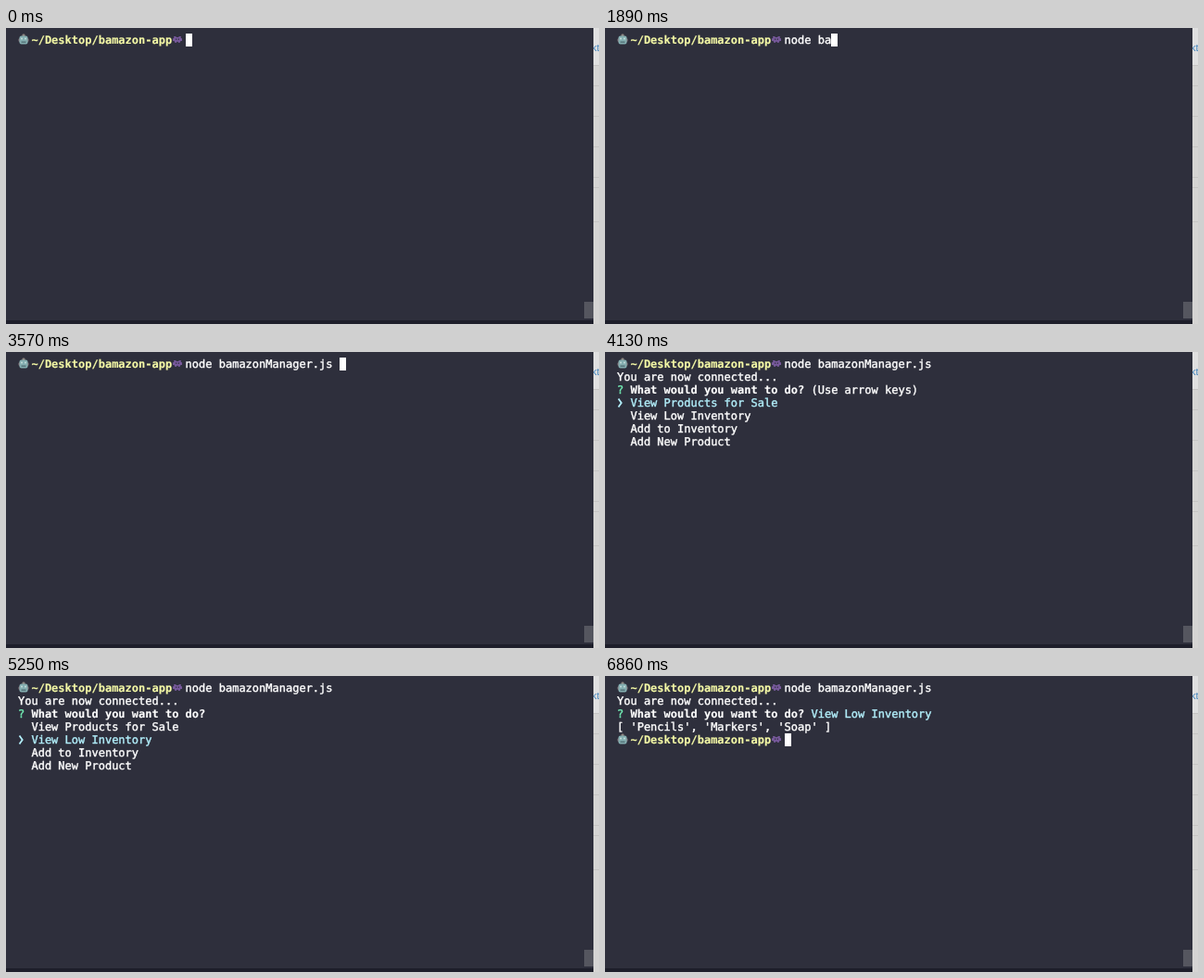
Animation, 640 px wide and 320 px high, one loop 6930 ms. Source, as an HTML page:

```html
<!DOCTYPE html>
<html lang="en">
<head>
<meta charset="utf-8">
<title>Terminal session</title>
<style>
  html, body { margin: 0; width: 100%; height: 100%; overflow: hidden; background: #2e2f3c; }
  svg { display: block; width: 640px; height: 320px; }
  text {
    font: 12px "DejaVu Sans Mono", monospace;
    text-rendering: geometricPrecision;
    white-space: pre;
    color: #fff;
    fill: currentColor;
    stroke: currentColor;
    stroke-width: 0.4;
  }
  .bold, .path { font-weight: bold; stroke-width: 0.15; }
  .path { color: #f4f9a6; }
  .green { color: #72ecb4; }
  .cyan { color: #b2effb; }
  .behind { font: 11px "Liberation Sans", sans-serif; color: #3f83bd; stroke: none; }
</style>
</head>
<body>
<svg viewBox="0 0 640 320">
  <defs>
    <g id="robot">
      <rect x="0.5" y="5" width="11" height="4" rx="1.5" fill="#85757a"/>
      <rect x="4.5" y="0.5" width="3" height="3" rx="1" fill="#8d8580"/>
      <rect x="1.5" y="2.5" width="9" height="9" rx="2" fill="#84aeb0"/>
      <circle cx="4" cy="5.5" r="1" fill="#c4dcda"/>
      <circle cx="8" cy="5.5" r="1" fill="#c4dcda"/>
      <rect x="3.5" y="8.5" width="5" height="1.5" fill="#56757b"/>
    </g>
    <g id="alien">
      <path d="M1 1h2l1 1h2l1-1h2L8.500 2.500 10 3.500v2.500H8.500L7.500 8H6.500L5 6.500 3.500 8h-1L1.500 6H0V3.500l1.500-1z" fill="#76589a"/>
      <path d="M3 3.500h1.300v1.300H3zM5.700 3.500H7v1.300H5.700z" fill="#2e2f3c"/>
    </g>
  </defs>
  <rect x="634" width="6" height="320" fill="#d5d4d3"/>
  <rect x="634" width="6" height="40" fill="#e0e0e0"/>
  <path d="M634 40.500h6M634 62.500h6M634 95.500h6M634 128.500h6M634 161.500h6M634 172.500h6M634 209.500h6" stroke="#c6c5c4"/>
  <text class="behind" x="632" y="24.500">kt</text>
  <rect width="634" height="320" fill="#2e2f3c"/>
  <rect y="316" width="634" height="4" fill="#1d1e2a"/>
  <rect x="624" y="296" width="10" height="18" fill="#55565f"/>
  <g id="screen"></g>
</svg>
<script>
const LOOP = 6930, STEP = 70;
const LEFT = 13, CELL = 7.224, ROW = 14;
const COMMAND = 'node bamazonManager.js ';
const CHOICES = ['View Products for Sale', 'View Low Inventory', 'Add to Inventory', 'Add New Product'];

// [time, characters on the command line]; the jumps are tab completions
const KEYS = [[350, 1], [490, 2], [560, 3], [700, 4], [840, 5], [1050, 6], [1260, 7],
  [2030, 12], [3080, 13], [3220, 23]];
const ENTER = 3640, MENU = 4130, DOWN = 4830, CHOOSE = 5600, DONE = 5670;

const screen = document.getElementById('screen');
const colX = col => LEFT + col * CELL;

const print = (row, col, str, cls = '') =>
  `<text class="${cls}" x="${colX(col)}" y="${17 + row * ROW}">${str}</text>`;

const cursor = (row, col) =>
  `<rect x="${Math.round(colX(col))}" y="${6 + row * ROW}" width="7" height="14" fill="#fff"/>`;

const prompt = row =>
  `<use href="#robot" x="13" y="${6 + row * ROW}"/>` +
  print(row, 2, '~/Desktop/bamazon-app', 'path') +
  `<use href="#alien" x="180" y="${8 + row * ROW}"/>`;

const pointer = row =>
  `<path d="M14.500 ${8.500 + row * ROW}l3.200 4.500-3.200 4.500" fill="none" stroke="#b2effb" stroke-width="1.800"/>`;

function menu(selected) {
  return CHOICES.map((choice, i) =>
    print(3 + i, 2, choice, i === selected ? 'cyan' : '')).join('') + pointer(3 + selected);
}

function typed(t) {
  return KEYS.reduce((count, [at, n]) => t >= at ? n : count, 0);
}

function view(t) {
  const count = typed(t);
  let out = prompt(0) + print(0, 25, COMMAND.slice(0, count));
  if (t < ENTER) return out + cursor(0, 25 + count);
  if (t < MENU) return out + cursor(1, 0);

  out += print(1, 0, 'You are now connected...') +
    print(2, 0, '?', 'green') + print(2, 2, 'What would you want to do?', 'bold');
  if (t < DOWN) return out + print(2, 29, '(Use arrow keys)') + menu(0);
  if (t < CHOOSE) return out + menu(1);

  out += print(2, 29, CHOICES[1], 'cyan');
  if (t < DONE) return out + cursor(3, 0);
  return out + print(3, 0, "[ 'Pencils', 'Markers', 'Soap' ]") + prompt(4) + cursor(4, 25);
}

let shown = '';
const start = performance.now();

function draw() {
  const t = (performance.now() - start) % LOOP;
  const next = view(Math.floor(t / STEP) * STEP);
  if (next !== shown) screen.innerHTML = shown = next;
  requestAnimationFrame(draw);
}
draw();
</script>
</body>
</html>
```
